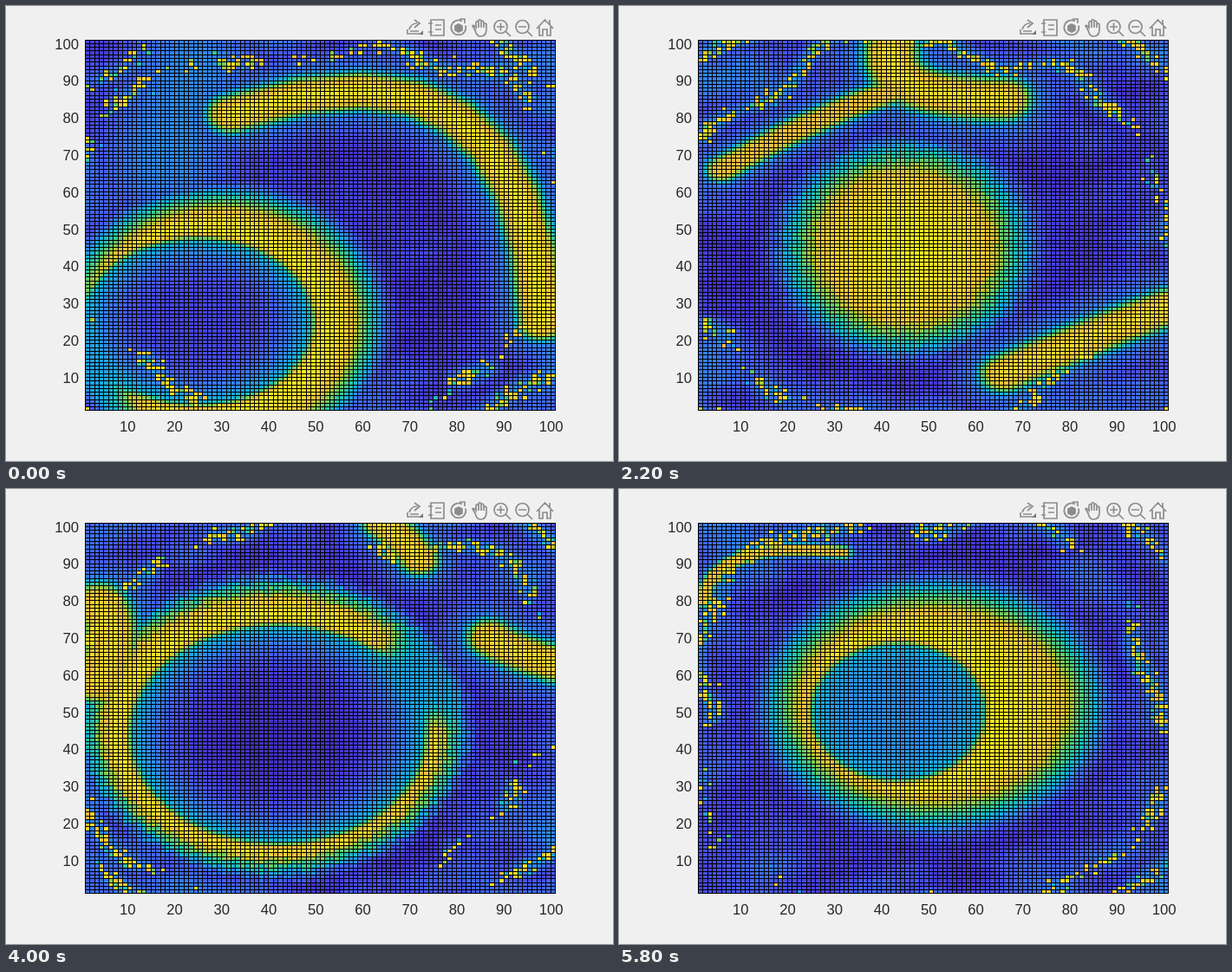
Animation of 700 by 525 pixels, one loop 6000 ms. Source, as an HTML page with a canvas:

```html
<!DOCTYPE html>
<html lang="en">
<head>
<meta charset="utf-8">
<title>Wave lattice</title>
<style>
  html, body { margin: 0; width: 100%; height: 100%; overflow: hidden; background: #f0f0f0; }
  canvas, svg { position: absolute; left: 0; top: 0; }
  text { font: 16.67px "Liberation Sans", Arial, sans-serif; fill: #262626; }
</style>
</head>
<body>
<canvas id="plot" width="700" height="525"></canvas>
<svg id="axes" width="700" height="525" viewBox="0 0 700 525">
  <g fill="none" stroke="#8c8c8c" stroke-width="1.7">
    <path d="M463 27v5h14M465 27c2-6 5-7 9-7M471 16l6 4-6 5M466 29h10"/>
    <path d="M476 33h5v-5z" fill="#777" stroke="none"/>
    <path d="M490 16h15v18h-15zM487 20h5M487 30h5M495 22h7M495 27h7"/>
    <path d="M526 17.500a8.500 8.500 0 1 0 4 5M523 15h6v5"/>
    <path d="M518 23l4-2 4 2v5l-4 2-4-2z" fill="#8c8c8c"/>
    <path d="M541 28l-3-5q1-2 4 2v-6q1-3 3 0v-2q1-3 3 0v1q2-2 3 1v2q3-2 3 1v5c0 5-2 8-7 8-3 0-5-3-6-7zM545 19v6M548 18v7M551 20v5"/>
    <path d="M576 29l6 6M566 24h9M570.500 19.500v9M601 29l6 6M591 24h9"/>
    <circle cx="570.500" cy="24" r="7.500"/><circle cx="595.500" cy="24" r="7.500"/>
    <path d="M612 26l9.500-10 9.500 10M615 24v10h4v-7h5v7h4v-10M627 16v5"/>
  </g>
</svg>
<script>
const N = 100, STEP = 200, LOOP = 6000;
const LEFT = 90.75, TOP = 38.56, WIDTH = 542.5, HEIGHT = 427.9;
const ctx = document.getElementById('plot').getContext('2d');

const mix = (a, b, u) => a + (b - a) * u;
const clamp = v => Math.max(0, Math.min(1, v));
const smooth = u => u * u * (3 - 2 * u);
const ellipse = (cx, cy, rx, ry) => ({ cx, cy, rx, ry });

// A soft stroke along a quadratic curve.
function trail(width, level, a, c, b) {
  const points = Array.from({ length: 9 }, (_, i) => {
    const t = i / 8;
    return [0, 1].map(k => mix(mix(a[k], c[k], t), mix(c[k], b[k], t), t));
  });
  return { width, level, points };
}

// A wave is the band between two ellipses, with one weak direction (gap, in radians).
const scenes = [
  { at: 0, inner: ellipse(25, 25, 23, 21), outer: ellipse(30, 25, 33, 35),
    core: .13, soft: 6, rough: .3, gap: -2.8, gapWidth: .6,
    trails: [trail(6, .96, [32, 81], [95, 107], [98, 25]), trail(9, .36, [24, 94], [21, 84], [18, 68])] },
  { at: 7, inner: ellipse(47, 49, 26, 31), outer: ellipse(45, 50, 36, 44),
    core: .01, soft: 5, rough: .5, gap: -.5, gapWidth: .8,
    trails: [trail(7, .93, [3, 74], [22, 95], [60, 89]), trail(9, 1, [24, 91], [40, 94], [57, 91]),
      trail(5, .93, [72, 2], [88, 4], [94, 20]), trail(4, .9, [75, 43], [75, 38], [79, 34]),
      trail(10, .4, [55, 10], [72, 18], [85, 23])] },
  { at: 11, inner: ellipse(46, 45, 0, 0), outer: ellipse(45, 45, 25, 27),
    core: 1, soft: 8, rough: 1, gap: 0, gapWidth: 0,
    trails: [trail(4, .9, [6, 66], [25, 80], [42, 87]), trail(7, .95, [42, 98], [41, 85], [66, 85]),
      trail(6, .94, [66, 11], [82, 20], [101, 29])] },
  { at: 16, inner: ellipse(45, 46, 24, 28), outer: ellipse(47, 48, 35, 38),
    core: .16, soft: 5, rough: .9, gap: .55, gapWidth: .28,
    trails: [trail(5, .95, [80, 95], [104, 86], [98, 58]), trail(12, .46, [82, 72], [88, 68], [90, 62])] },
  { at: 20, inner: ellipse(42, 44, 30, 28), outer: ellipse(41, 46, 40, 39),
    core: .05, soft: 5, rough: 1, gap: .45, gapWidth: .35,
    trails: [trail(7, .94, [4, 79], [9, 72], [4, 58]), trail(5, .94, [64, 101], [69, 97], [72, 91]),
      trail(6, .94, [87, 70], [92, 66], [101, 63])] },
  { at: 25, inner: ellipse(45, 50, 33, 34), outer: ellipse(44, 48, 39, 42),
    core: .015, soft: 5, rough: 1, gap: .4, gapWidth: .5,
    trails: [trail(6, .96, [78, 97], [100, 85], [86, 50]), trail(4, .93, [57, 84], [67, 80], [73, 75]),
      trail(5, .92, [90, 11], [94, 8], [99, 4]), trail(9, .45, [79, 80], [82, 70], [80, 60])] },
  { at: 29, inner: ellipse(43.5, 50, 17, 17), outer: ellipse(51, 52, 34.5, 32),
    core: .36, soft: 8, rough: .5, gap: 0, gapWidth: 0,
    trails: [trail(2, .9, [2, 80], [4, 97], [32, 93])] }
];
// Scenes reached by a new wave starting at the centre.
const births = [2, 6];

function hash(x, y, seed) {
  const s = Math.sin(x * 127.1 + y * 311.7 + seed * 74.7) * 43758.5453;
  return s - Math.floor(s);
}

function noise(x, y, seed) {
  const i = Math.floor(x), j = Math.floor(y), u = smooth(x - i), v = smooth(y - j);
  return mix(mix(hash(i, j, seed), hash(i + 1, j, seed), u),
    mix(hash(i, j + 1, seed), hash(i + 1, j + 1, seed), u), v);
}

// Dark around the middle, bluer and streakier towards the border.
function backdrop(x, y, seed) {
  const far = smooth(clamp((Math.hypot(x - 50, y - 50) - 32) / 28));
  return .03 + mix(.08, .3, far) * noise((x + y) / 13, (y - x * .5) / 8, seed) + .05 * hash(x, y, seed);
}

function distance(points, x, y) {
  let best = 1e9;
  for (let i = 1; i < points.length; i++) {
    const [ax, ay] = points[i - 1], dx = points[i][0] - ax, dy = points[i][1] - ay;
    const t = clamp(((x - ax) * dx + (y - ay) * dy) / (dx * dx + dy * dy));
    best = Math.min(best, Math.hypot(x - ax - t * dx, y - ay - t * dy));
  }
  return best;
}

function trailsAt(trails, x, y) {
  let v = 0;
  for (const { width, level, points } of trails) {
    const d = distance(points, x, y) / width;
    v = Math.max(v, level * Math.exp(-(d ** 3) * .8), Math.min(level, .42) * Math.exp(-d * d / 4));
  }
  return v;
}

// Broken filaments run along two wavy circles near the border and corners.
function specksAt(x, y, seed) {
  const dx = x - 50, dy = y - 50, r = Math.hypot(dx, dy), cx = 3 * dx / r + 9, cy = 3 * dy / r + 9;
  let v = 0;
  for (const size of [52, 66]) {
    const d = r - size - 14 * (noise(cx, cy, seed + size) - .5);
    const strength = smooth(clamp(noise(cx * 2, cy * 2, seed + size + 1) * 2 - .3));
    v = Math.max(v, .36 * strength * Math.exp(-d * d / 16));
    if (hash(x, y, seed + 9) < .7 * strength * Math.exp(-d * d / 2.5)) v = .96 - .6 * hash(y, x, seed) ** 3;
  }
  return v;
}

const cells = fn => Float32Array.from({ length: N * N }, (_, k) => fn(k % N + 1.5, Math.floor(k / N) + 1.5));
scenes.forEach((scene, i) => {
  scene.marks = cells((x, y) => Math.max(trailsAt(scene.trails, x, y), specksAt(x, y, i)));
  scene.base = cells((x, y) => backdrop(x, y, i));
});

// Signed distance from an ellipse, negative inside.
function offset({ cx, cy, rx, ry }, x, y) {
  const r = Math.hypot(x - cx, y - cy);
  return rx ? r - r / Math.hypot((x - cx) / rx, (y - cy) / ry) : r;
}

function ringAt(ring, x, y, base) {
  const { inner, outer, core } = ring;
  const inside = offset(inner, x, y);
  const left = (hash(x, y, 5) - .5) * 2 * ring.rough - offset(outer, x, y);
  const turn = Math.atan2(y - inner.cy, x - inner.cx) - ring.gap;
  const swing = Math.atan2(Math.sin(turn), Math.cos(turn)) / (ring.gapWidth + .001);
  const amp = 1 - .95 * Math.exp(-(swing ** 4)) * Math.min(1, ring.gapWidth * 4);
  const edge = Math.max(.48, core);
  if (inside < 0) return mix(edge, core, 1 - (1 + inside / Math.max(inner.rx, inner.ry)) ** 4);
  if (left < 0) return Math.max(base, mix(.4, .5, amp) * Math.exp(left / (ring.soft * .5)));
  const rise = smooth(clamp(inside / 3.5)), fall = clamp(left / ring.soft);
  const crest = 1 - .12 * inside / (inside + left);
  return mix(.42, Math.min(mix(edge, crest, rise), mix(.5, crest, fall)), amp);
}

const blend = (a, b, u) => Object.fromEntries(Object.keys(a).map(key => [key, mix(a[key], b[key], u)]));

function blendRings(a, b, u) {
  const pick = ({ core, soft, rough, gap, gapWidth }) => ({ core, soft, rough, gap, gapWidth });
  const early = Math.sqrt(u);
  return { ...blend(pick(a), pick(b), u), core: mix(a.core, b.core, early),
    inner: blend(a.inner, b.inner, early), outer: blend(a.outer, b.outer, u) };
}

const resize = (e, k) => ({ ...e, rx: e.rx * k, ry: e.ry * k });
const scaleRing = (ring, inner, outer, core) =>
  ({ ...ring, core, inner: resize(ring.inner, inner), outer: resize(ring.outer, outer) });

const colors = ['#3e26a8', '#463cd6', '#475af5', '#397afe', '#2797eb', '#14b0d8', '#2dc49f',
  '#76ca5c', '#c3c22e', '#f9be3f', '#f9fb15'];
const palette = Array.from({ length: 256 }, (_, k) => {
  const v = k / 255 * (colors.length - 1), i = Math.min(colors.length - 2, Math.floor(v));
  const channel = (color, c) => parseInt(color.slice(c, c + 2), 16);
  return `rgb(${[1, 3, 5].map(c => Math.round(mix(channel(colors[i], c), channel(colors[i + 1], c), v - i)))})`;
});

const edgeX = i => Math.round(LEFT + i * WIDTH / N);
const edgeY = j => Math.round(TOP + (N - j) * HEIGHT / N);

function draw(step) {
  const next = Math.max(1, scenes.findIndex(s => s.at >= step));
  const a = scenes[next - 1], b = scenes[next], u = (step - a.at) / (b.at - a.at);
  const born = births.includes(next);
  const ring = born ? scaleRing(a, 1 + .15 * u, 1 + .15 * u, a.core) : blendRings(a, b, u);
  const fresh = born && scaleRing(b, u ** 2, mix(.6, 1, u), mix(1, b.core, u ** 4));
  for (let j = 0; j < N; j++) {
    for (let i = 0; i < N; i++) {
      const k = j * N + i, x = i + 1.5, y = j + 1.5, base = mix(a.base[k], b.base[k], u);
      let v = ringAt(ring, x, y, base);
      if (born) v = mix(v, ringAt(fresh, x, y, base), u * u);
      v = Math.max(v, mix(a.marks[k], b.marks[k], u));
      ctx.fillStyle = palette[Math.round(clamp(v) * 255)];
      ctx.fillRect(edgeX(i), edgeY(j + 1), edgeX(i + 1) - edgeX(i), edgeY(j) - edgeY(j + 1));
    }
  }
  ctx.fillStyle = '#000';
  for (let i = 0; i <= N; i++) {
    ctx.fillRect(edgeX(i), edgeY(N), 1, edgeY(0) - edgeY(N) + 1);
    ctx.fillRect(edgeX(0), edgeY(i), edgeX(N) - edgeX(0) + 1, 1);
  }
}

function label(text, x, y, anchor) {
  const node = document.createElementNS('http://www.w3.org/2000/svg', 'text');
  node.setAttribute('x', x);
  node.setAttribute('y', y);
  node.setAttribute('text-anchor', anchor);
  node.textContent = text;
  document.getElementById('axes').append(node);
}
for (let n = 10; n <= 100; n += 10) {
  label(n, LEFT + .75 + (n - 1) * WIDTH / N, 491, 'middle');
  label(n, 84, TOP + 6.8 + (101 - n) * HEIGHT / N, 'end');
}

const start = performance.now();
let shown = -1;
function tick() {
  const step = Math.floor((performance.now() - start) % LOOP / STEP);
  if (step !== shown) draw(shown = step);
  requestAnimationFrame(tick);
}
tick();
</script>
</body>
</html>
```
